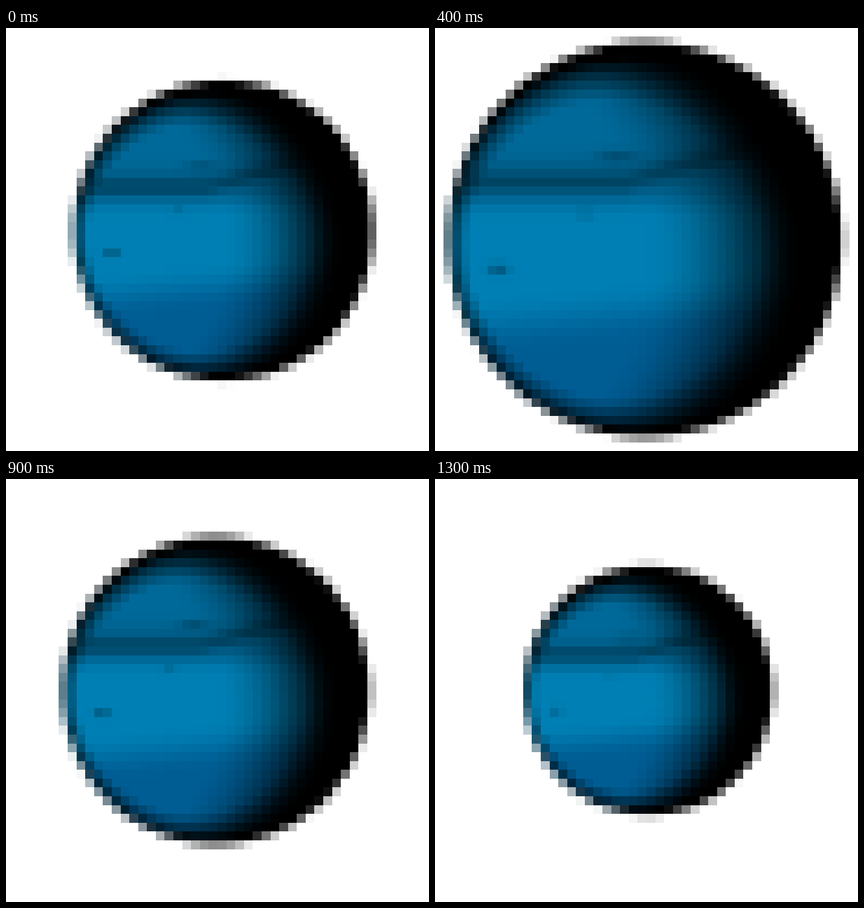
Recreate the animation shown at these times as an HTML page with a canvas. Size 748 px wide and 748 px high, loop 1500 ms.

```html
<!DOCTYPE html>
<html lang="en">
<head>
<meta charset="utf-8">
<title>Pulsing planet</title>
<style>
  html, body { margin: 0; width: 100%; height: 100%; overflow: hidden; background: #fff; }
  canvas { display: block; width: 748px; height: 748px; }
</style>
</head>
<body>
<canvas id="stage" width="748" height="748"></canvas>
<script>
const ctx = document.getElementById('stage').getContext('2d');
const SIZE = 748, CELLS = 48, PITCH = 15.588, LOOP = 1500;

// Hard size changes: start time, centre and radius in cells
const poses = [
  { at: 0, x: 24.6, y: 23, r: 17.03 },
  { at: 200, x: 24.35, y: 23.5, r: 18.68 },
  { at: 400, x: 23.78, y: 24, r: 22.4 },
  { at: 900, x: 23.8, y: 24, r: 17.45 },
  { at: 1100, x: 23.8, y: 24, r: 11.97 },
  { at: 1300, x: 24.18, y: 24, r: 14.13 }
];

const clamp = n => Math.max(0, Math.min(1, n));
const mix = (a, b, k) => a + (b - a) * k;
const bell = d => Math.exp(-d * d);
const smooth = (from, to, n) => {
  const k = clamp((n - from) / (to - from));
  return k * k * (3 - 2 * k);
};
const edge = k => Math.round(SIZE / 2 + (k - CELLS / 2) * PITCH);

// Cloud colour: a bright equator between a greenish north and a bluish south
function clouds(u, v) {
  const lat = v + .1 * u;
  const zone = smooth(-.27, -.1, v) * (1 - smooth(.2, .5, lat));
  const south = smooth(-.1, .6, lat);
  return [
    mix(mix(105, 93, south), 127, zone),
    mix(mix(153, 148, south), 180, zone)
  ];
}

// Dark belt that bends north on the right, a wisp and two small spots
function markings(u, v) {
  const spot = (x, y, w, h) => bell(Math.hypot((u - x) / w, (v - y) / h));
  const off = v + .29 + .28 * Math.max(0, u + .1);
  const belt = .2 * bell(off / .05) + .15 * bell((off + .01) / .11);
  const spots = .22 * spot(-.14, -.42, .1, .035)
    + .3 * spot(-.74, .152, .05, .03)
    + .12 * spot(-.3, -.13, .04, .03);
  return (1 - belt) * (1 - spots);
}

function light(u, v) {
  const depth = Math.sqrt(Math.max(0, 1 - u * u - v * v));
  const limb = clamp((depth - .25 * u + .08 * v - .33) / .35);
  const dusk = .78 + .1 * v - .55 * v * v;
  const day = Math.sin(clamp((dusk - u) / .8) * Math.PI / 2) ** 1.2;
  return limb * day;
}

function drawCell(col, row, pose) {
  const dx = col + .5 - pose.x, dy = row + .5 - pose.y;
  const dist = Math.hypot(dx, dy);
  const bulge = .12 * Math.sin(2 * Math.atan2(dy, dx)) ** 2;
  const cover = clamp(pose.r + bulge - dist + .5);
  if (!cover) return;
  const scale = Math.min(1, (pose.r - .5) / dist) / pose.r;
  const u = dx * scale, v = dy * scale;
  const [g, b] = clouds(u, v);
  const lit = light(u, v) * markings(u, v);
  const tone = c => Math.round(mix(255, c * lit, cover));
  const x = edge(col), y = edge(row);
  ctx.fillStyle = `rgb(${tone(0)},${tone(g)},${tone(b)})`;
  ctx.fillRect(x, y, edge(col + 1) - x, edge(row + 1) - y);
}

function draw(pose) {
  ctx.fillStyle = '#fff';
  ctx.fillRect(0, 0, SIZE, SIZE);
  for (let row = 0; row < CELLS; row++)
    for (let col = 0; col < CELLS; col++) drawCell(col, row, pose);
}

let shown;
function tick() {
  const t = performance.now() % LOOP;
  const pose = poses.filter(p => p.at <= t).pop();
  if (pose !== shown) draw(shown = pose);
  requestAnimationFrame(tick);
}
tick();
</script>
</body>
</html>
```
